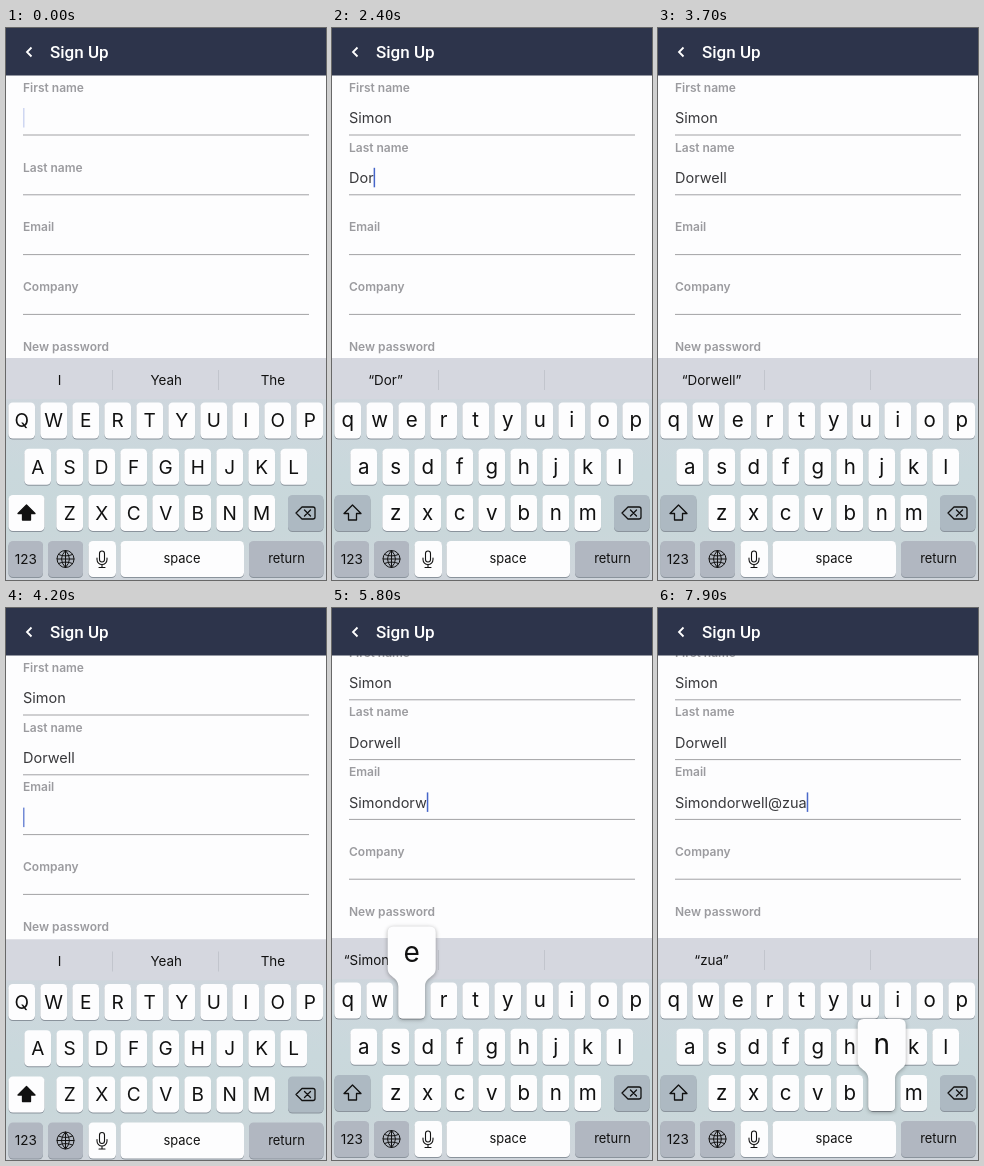
Write an HTML page that moves like this. It is 320x552 px and loops after 8000 ms.

```html
<!DOCTYPE html>
<html lang="en">
<head>
<meta charset="utf-8">
<title>Sign Up</title>
<style>
html, body { margin: 0; width: 100%; height: 100%; overflow: hidden; background: #fdfdfe; }
svg { display: block; font-family: Inter, "Open Sans", sans-serif; }
.cap { filter: drop-shadow(0 1px 0 #8a939c); }
.pop { filter: drop-shadow(0 1px 2px #0005); }
</style>
</head>
<body>
<svg width="320" height="552" viewBox="0 0 320 552">
  <defs>
    <linearGradient id="kb" x2="0" y2="1">
      <stop stop-color="#d2d6de"/><stop offset=".5" stop-color="#c9d8dc"/>
      <stop offset=".75" stop-color="#c9d7da"/><stop offset="1" stop-color="#d1d5dc"/>
    </linearGradient>
    <linearGradient id="head" gradientUnits="userSpaceOnUse" x1="105" x2="118">
      <stop stop-color="#222" stop-opacity=".25"/><stop offset="1" stop-color="#222"/>
    </linearGradient>
  </defs>
  <g id="form"></g>
  <g id="keyboard"></g>
  <rect width="320" height="47.5" fill="#2d344b"/>
  <path d="M25.5 19.5l-4.5 4.5 4.5 4.5" fill="none" stroke="#fff" stroke-width="1.8"/>
  <text x="44" y="30" font-size="17" font-weight="500" fill="#fff" style="font-family:Roboto,sans-serif">Sign Up</text>
</svg>
<script>
const LOOP = 8000, STEP = 100, INK = '#111', FN = '#adb9c2';
const form = document.getElementById('form'), keyboard = document.getElementById('keyboard');
const ruler = document.createElement('canvas').getContext('2d');
const labels = ['First name', 'Last name', 'Email', 'Company', 'New password'];
const focusAt = [-300, 1600, 4000];

// Every keystroke: the moment its character lands and the field it goes to
const strokes = [];
function type(field, word, from, to = from) {
  [...word].forEach((ch, i) =>
    strokes.push({ field, ch, at: from + (to - from) * i / Math.max(1, word.length - 1) }));
}
type(0, 'Simon', 500, 950);
type(1, 'Dorwell', 2000, 3200);
type(2, 'Simon', 4500, 5000);
type(2, 'dorwell', 5250, 6150);
type(2, '@', 6700);
type(2, 'zua', 7200, 7750);
type(2, 'n', 8000);

const clamp = v => Math.min(1, Math.max(0, v));
const ease = v => 1 - (1 - clamp(v)) ** 3;
const esc = s => s.replace(/&/g, '&amp;');

// Text centred vertically on y
function text(x, y, s, size, extra = '') {
  return `<text x="${x}" y="${y + size * .363}" font-size="${size}" ${extra}>${esc(s)}</text>`;
}
const mid = (x, y, s, size, extra = '') => text(x, y, s, size, `text-anchor="middle" fill="${INK}" ${extra}`);
const rect = (x, y, w, h, fill, extra = '') =>
  `<rect x="${x}" y="${y}" width="${w}" height="${h}" fill="${fill}" ${extra}/>`;
const cap = (x, y, w, fill = '#fdfdfe') => rect(x, y, w, 36, fill, 'rx="4.5" class="cap"');
const icon = (d, fill = 'none', width = 1.3) =>
  `<path d="${d}" fill="${fill}" stroke="${INK}" stroke-width="${width}" stroke-linejoin="round" stroke-linecap="round"/>`;

function drawForm(t, active, values, lastEvent) {
  const scroll = 15.2 * ease((t - 4400) / 300);
  let out = '';
  labels.forEach((label, i) => {
    const y = 107 + 59.8 * i - scroll;
    const lift = i < 3 ? ease((t - focusAt[i]) / 200) : 0;
    out += text(17, y - 27.5 - 20 * lift, label, 12, 'font-weight="600" fill="#9b9b9f"');
    out += rect(17, y - .5, 286, 1, '#a2a2a5');
    if (values[i]) out += text(17, y - 17, values[i], 14.5, 'fill="#38383b"');
    if (i === active) {
      ruler.font = '14.5px Inter, "Open Sans", sans-serif';
      const x = 17 + ruler.measureText(values[i]).width;
      const glow = clamp(.5 + .8 * Math.cos((t - lastEvent) / 1000 * 2 * Math.PI));
      out += rect(x, y - 27, 1.5, 19.5, '#4565c9', `opacity="${glow}"`);
    }
  });
  return out;
}

function longWords(words, opacity) {
  return words.map((w, i) => {
    const x = [4, 110, 217][i];
    return `<linearGradient id="tail${i}" gradientUnits="userSpaceOnUse" x1="${x + 22}" x2="${x + 98}">
      <stop stop-color="#222"/><stop offset=".35" stop-color="#222" stop-opacity=".35"/>
      <stop offset="1" stop-color="#222" stop-opacity=".12"/></linearGradient>` +
      text(x, 352, w, 13.4, `fill="url(#tail${i})" opacity="${opacity}"`);
  }).join('');
}

function drawSuggestions(t, value) {
  const slots = words => words.map((w, i) => mid(53.5 + 106.7 * i, 352, w, 13.4)).join('');
  const full = ['“Simondorwell”', 'Simondorwellish', 'Simondorwellish'];
  if (!value) return slots(['I', 'Yeah', 'The']);
  if (value.endsWith('@')) return (t < 6800 ? longWords(full, .8) : '') + slots(['is', 'and', 'of']);
  const word = value.split('@').pop();
  if (word === 'Simon')
    return slots(['“Simon”', '', 'Simon\'s']) + text(200, 352, 'imonwammers', 13.4, 'text-anchor="end" fill="url(#head)"');
  if (word.length === 12) return longWords(full, 1);
  return word.length > 9 ? longWords([`“${word}”`], 1) : slots([`“${word}”`]);
}

function popup(x, y, ch) {
  return `<path class="pop" fill="#fdfdfe" d="M${x - 18} ${y - 56}h36q6 0 6 6v36c0 9 -10.7 8 -10.7 18v27.500q0 4.500 -4.500 4.500h-17.600q-4.500 0 -4.500 -4.500v-27.500c0 -10 -10.700 -9 -10.700 -18v-36q0 -6 6 -6z"/>` +
    mid(x, y - 31, ch, 28);
}

function drawKeyboard(t, active, values) {
  const value = values[active];
  const numeric = t >= 6400 && t < 6900;
  const caps = !value;
  const rows = numeric ? ['1234567890', '-/:;()¥&@”', '.,?!’'] : ['qwertyuiop', 'asdfghjkl', 'zxcvbnm'];
  const pressed = strokes.find(k => t >= k.at - 100 && t < k.at);
  let bubble = '';
  let out = rect(0, 330, 320, 230, 'url(#kb)') + rect(0, 330, 320, 41, '#d5d7df');
  out += rect(106, 342, 1, 20, '#c2c5cd') + rect(212, 342, 1, 20, '#c2c5cd');
  out += drawSuggestions(t, value);

  rows.forEach((row, r) => {
    const y = 374.5 + 46.2 * r, wide = numeric && r === 2;
    const pitch = wide ? 45 : 32, w = wide ? 40 : 26.7;
    [...row].forEach((key, i) => {
      const x = 160 + (i - (row.length - 1) / 2) * pitch - (wide ? 0 : .3);
      const ch = caps ? key.toUpperCase() : key;
      const size = numeric || caps ? 19 : 20.5;
      out += cap(x - w / 2, y, w) + mid(x, y + 18 + (numeric || caps ? 0 : -.5), ch, size);
      if (pressed && pressed.ch === ch) bubble = popup(x, y, ch);
    });
  });

  // Shift and delete
  const up = caps && !numeric;
  out += cap(2.5, 467, 36, up ? '#fdfdfe' : FN);
  out += numeric ? mid(20.5, 485, '#+=', 10.5)
    : icon('M20.5 477l8.500 8.500h-4.500v6.500h-8v-6.500h-4.500z', up ? INK : 'none');
  out += cap(282, 467, 35.5, FN);
  out += icon('M296 479h11q2 0 2 2v8q0 2 -2 2h-11l-6 -6zM298.500 482l6 6m0 -6l-6 6');

  // Bottom row
  const grey = '#b1b7c1';
  out += cap(2.5, 513, 34.5, grey) + mid(19.7, 531, numeric ? 'ABC' : '123', 13.5);
  out += cap(42, 513, 35, grey) + icon('M51 531a8.500 8.500 0 1 0 17 0a8.500 8.500 0 1 0 -17 0h17M59.500 522.500v17q-8 -8.500 0 -17q8 8.500 0 17M52.500 526.500q7 3 14 0M52.500 535.500q7 -3 14 0', 'none', 1);
  out += cap(82.5, 513, 27.5) + icon('M93.500 525.500a2.500 2.500 0 0 1 5 0v6a2.500 2.500 0 0 1 -5 0zM91 530v1.500a5 5 0 0 0 10 0v-1.500M96 536.500v3m-3 0h6', 'none', 1.1);
  out += cap(114.5, 513, 123.5) + mid(176, 530.5, 'space', 12.9);
  out += cap(243, 513, 74.5, grey) + mid(280.5, 530.5, 'return', 12.9);
  return out + bubble;
}

function draw(t) {
  const active = focusAt.filter(f => f <= t).length - 1;
  const done = strokes.filter(k => k.at <= t);
  const values = focusAt.map((_, i) => done.filter(k => k.field === i).map(k => k.ch).join(''));
  const lastEvent = Math.max(focusAt[active], ...done.map(k => k.at));
  const dip = active ? 14 * Math.exp((focusAt[active] - t) / 90) : 0;
  form.innerHTML = drawForm(t, active, values, lastEvent);
  keyboard.innerHTML = drawKeyboard(t, active, values);
  keyboard.setAttribute('transform', `translate(0 ${dip < .3 ? 0 : dip})`);
}

let shown = -1;
function tick() {
  const t = Math.floor(performance.now() % LOOP / STEP) * STEP;
  if (t !== shown) draw(shown = t);
  requestAnimationFrame(tick);
}
tick();
</script>
</body>
</html>
```
